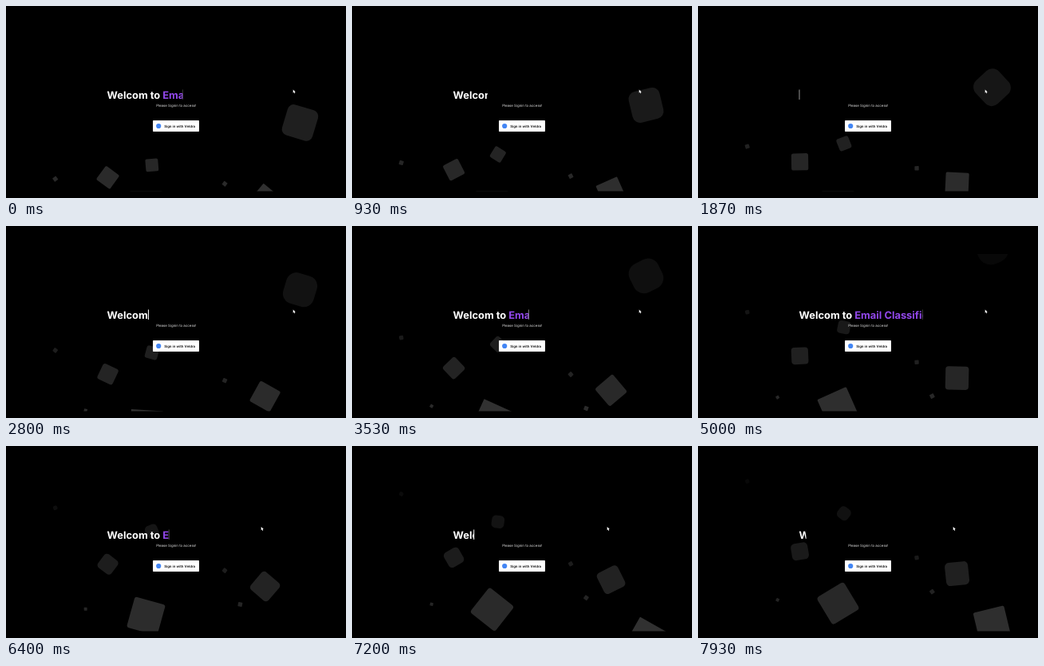
Recreate the animation shown at these times as an HTML page. Size 426 px wide and 240 px high, loop 8000 ms.

```html
<!DOCTYPE html>
<html lang="en">
<head>
<meta charset="utf-8">
<title>Sign in</title>
<style>
  html, body { margin: 0; width: 100%; height: 100%; overflow: hidden; background: #000; }
  svg { display: block; width: 100vw; height: 100vh; }
  text { font-family: Inter, sans-serif; text-rendering: geometricPrecision; white-space: pre; }
  .title { font-size: 12.9px; font-weight: 700; fill: #fff; }
  .title tspan { fill: #9147ea; }
  .small { font-size: 4.38px; fill: #e4e4e4; text-anchor: middle; }
  .label { font-size: 4.35px; font-weight: 600; fill: #111; }
</style>
</head>
<body>
<svg viewBox="0 0 426 240">
  <defs>
    <clipPath id="page"><rect x="20.5" y="35" width="386" height="196.6"/></clipPath>
    <clipPath id="typed"><rect id="reveal" x="126" y="98" width="0" height="22"/></clipPath>
  </defs>
  <rect width="426" height="240" fill="#000"/>
  <g id="squares" clip-path="url(#page)" fill="#fff"></g>
  <g clip-path="url(#typed)">
    <text class="title" x="126.5" y="115.6">Welcom to <tspan>Email Classifier</tspan></text>
  </g>
  <rect id="caret" y="104.5" width="1" height="12.5" fill="#fff"/>
  <text class="small" x="213.2" y="126.3">Please Signin to access!</text>
  <rect x="184" y="143" width="58" height="14" rx="0.8" fill="#fff"/>
  <circle cx="191.2" cy="150" r="3.1" fill="#4285f4"/>
  <text class="label" x="198.2" y="151.6">Sign in with Veldra</text>
  <path id="pointer" d="M0 0V4.3L1 3.4L1.7 4.9L2.5 4.5L1.8 3.1H3.1Z" fill="#fff"/>
</svg>
<script>
const LOOP = 8000, SCALE = 0.265, LEFT = 20.5, WIDTH = 386, BOTTOM = 231.6;
const RISE = 1000 * SCALE, START = 4.38, RATE = 0.982;
const TITLE_X = 127, TITLE_W = 171.5, STEPS = 20, TYPE_TIME = 3, TYPE_START = 1.77;
const BLINK = 0.5, BLINK_OFF = 0.455;

const $ = id => document.getElementById(id);
const clamp = v => Math.min(1, Math.max(0, v));
const mod = (a, n) => ((a % n) + n) % n;
const set = (el, attrs) => {
  for (const key in attrs) el.setAttribute(key, attrs[key]);
};

// left %, size px, delay s, duration s
const squares = [
  [25, 80, 0, 25], [10, 20, 2, 12], [70, 20, 4, 25],
  [40, 60, 0, 18], [65, 20, 0, 25], [75, 110, 3, 25],
  [35, 150, 7, 25], [20, 15, 2, 35], [85, 150, 0, 11]
].map(([left, px, delay, duration]) => {
  const size = px * SCALE;
  const el = document.createElementNS("http://www.w3.org/2000/svg", "rect");
  set(el, { x: -size / 2, y: -size / 2, width: size, height: size });
  $("squares").append(el);
  return {
    el, size, delay, duration,
    x: LEFT + WIDTH * left / 100 + size / 2,
    y: BOTTOM + 150 * SCALE - size / 2
  };
});

function drawSquares(s) {
  const now = START + s * RATE;
  for (const q of squares) {
    const p = Math.max(0, now - q.delay) / q.duration % 1;
    set(q.el, {
      transform: `translate(${q.x} ${q.y - RISE * p}) rotate(${720 * p})`,
      rx: q.size / 2 * p,
      opacity: 0.2 * (1 - p)
    });
  }
}

function drawTitle(s) {
  const phase = mod(s - TYPE_START, 2 * TYPE_TIME) / TYPE_TIME;
  const u = phase < 1 ? phase : 2 - phase;
  const w = Math.floor(u * STEPS) / STEPS * TITLE_W;
  set($("reveal"), { width: w + 1 });
  const off = mod(s - BLINK_OFF, BLINK);
  const gap = Math.min(off, BLINK - off);
  set($("caret"), { x: TITLE_X + w - 0.5, opacity: clamp((gap - 0.02) * 9) });
}

function drawPointer(s) {
  const k = clamp((s - 5.4) / 0.5);
  const e = k * k * (3 - 2 * k);
  set($("pointer"), { transform: `translate(${359.7 - 40 * e} ${104.4 - 3.4 * e})` });
}

function draw(ms) {
  const s = mod(ms, LOOP) / 1000;
  drawSquares(s);
  drawTitle(s);
  drawPointer(s);
}

const begin = performance.now();
function tick() {
  draw(performance.now() - begin);
  requestAnimationFrame(tick);
}
tick();
</script>
</body>
</html>
```
